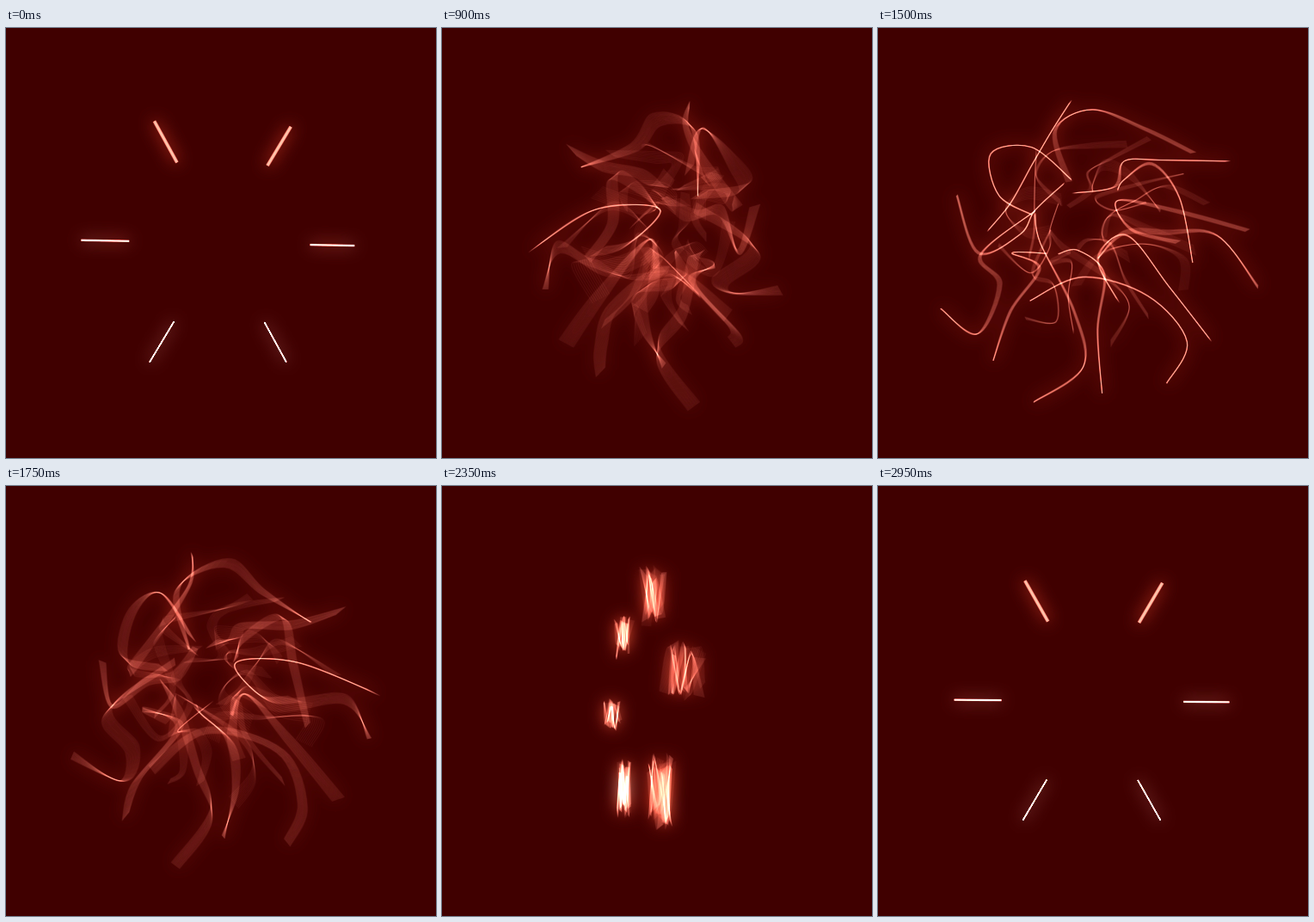
Write an HTML page with a canvas that moves like this. It is 500 by 500 pixels and loops after 3000 ms.

```html
<!DOCTYPE html>
<html lang="en">
<head>
<meta charset="utf-8">
<title>Ribbons</title>
<style>
  html, body { margin: 0; width: 100%; height: 100%; overflow: hidden; background: #400000; }
  canvas { display: block; width: 500px; height: 500px; }
</style>
</head>
<body>
<canvas id="stage" width="500" height="500"></canvas>
<script>
const SIZE = 500, MID = 250, LOOP = 3000, LEAD = 85;
const FOLDED = 585, OPEN = 1385;
const POINTS = 5;

const stage = document.getElementById('stage').getContext('2d');
const layer = document.createElement('canvas');
layer.width = layer.height = SIZE;
const ink = layer.getContext('2d');

// Fully opened strands, clockwise from the top, outer end first.
const OPEN_STRANDS = [
  [275, 85, 298, 120, 322, 160, 348, 205, 374, 236],
  [320, 218, 360, 195, 370, 146, 322, 138, 276, 176],
  [408, 194, 384, 262, 335, 240, 318, 212, 283, 180],
  [428, 327, 385, 358, 359, 300, 382, 265, 318, 213],
  [365, 388, 345, 330, 312, 280, 345, 262, 305, 262],
  [318, 436, 260, 395, 272, 330, 312, 250, 318, 215],
  [238, 425, 243, 350, 236, 285, 268, 258, 292, 262],
  [163, 413, 139, 365, 185, 312, 262, 290, 325, 318],
  [113, 361, 160, 300, 210, 240, 245, 268, 222, 318],
  [57, 300, 105, 240, 165, 237, 215, 238, 245, 268],
  [135, 272, 150, 195, 182, 156, 215, 175, 222, 188],
  [70, 236, 150, 213, 222, 200, 205, 235, 150, 250],
  [92, 154, 170, 153, 215, 155, 225, 185, 272, 192],
  [132, 146, 190, 117, 252, 94, 296, 118, 280, 178]
];
const LAST = OPEN_STRANDS.length - 1;
const SPOKE = [0, 0, 1, 1, 2, 2, 2, 3, 3, 3, 4, 4, 5, 5];

// Centre and half size of each folded bundle.
const BUNDLES = [
  [256, 128, 16, 38], [222, 211, 27, 36], [249, 352, 19, 46],
  [292, 352, 10, 35], [303, 267, 12, 19], [290, 176, 11, 28]
];

const rad = deg => deg * Math.PI / 180;
const clamp = v => Math.max(0, Math.min(1, v));
const smooth = v => v * v * (3 - 2 * v);
const mix = (a, b, k) => a.map((v, i) => v + (b[i] - v) * k);
const random = n => {
  const v = Math.sin(n * 127.1 + 3.7) * 43758.5453;
  return v - Math.floor(v);
};

// Every pose returns [x, y, dx, dy]: a point and the ribbon's width vector there.
function spokePose(spoke, p, turn) {
  const angle = rad(240 - 60 * spoke);
  const radius = 160 - 54 * p / (POINTS - 1);
  const yaw = rad(34 * turn + 40 * turn * turn), roll = rad(7.6 * turn);
  const flatX = radius * Math.cos(angle);
  const scale = 700 / (700 + flatX * Math.sin(yaw));
  const x = flatX * Math.cos(yaw) * scale;
  const y = radius * Math.sin(angle) * scale;
  const width = 1.65 - 1.85 * Math.sin(angle);
  return [
    MID + x * Math.cos(roll) - y * Math.sin(roll),
    MID + x * Math.sin(roll) + y * Math.cos(roll),
    -Math.sin(angle) * width, Math.cos(angle) * width
  ];
}

function bundlePose(strand, p, ghost) {
  const [cx, cy, w, h] = BUNDLES[SPOKE[strand]];
  const seed = strand * 17 + p * 3 + ghost * 311;
  const side = strand % 2 ? 1 : -1;
  const x = w * side * ((p - 2) * 0.33 + 0.5 * (random(seed) - 0.5));
  const y = h * (p % 2 ? -1 : 1) * side * (0.45 + 0.55 * random(seed + 1));
  return [cx + x, cy + y,
    w * 1.1 * (random(seed + 2) - 0.3), h * 0.6 * (random(seed + 5) - 0.5)];
}

function openPose(strand, p, ghost) {
  let x = OPEN_STRANDS[strand][2 * p], y = OPEN_STRANDS[strand][2 * p + 1];
  if (ghost) {
    const dx = x - 264, dy = y - 225, a = 0.5;
    x = 264 + 0.68 * (dx * Math.cos(a) - dy * Math.sin(a));
    y = 225 + 0.68 * (dx * Math.sin(a) + dy * Math.cos(a));
  }
  const seed = strand * 7 + ghost * 53;
  const facing = 6.28 * random(seed);
  const width = (2 + 7 * random(seed + 1)) * (1 + 0.8 * ghost) * Math.sin(6.28 * random(seed + 2) + p * 0.9);
  return [x, y, Math.cos(facing) * width, Math.sin(facing) * width];
}

function strandPose(strand, p, time, ghost) {
  const bundle = bundlePose(strand, p, ghost);
  if (time < FOLDED) {
    const turn = time / FOLDED;
    return mix(spokePose(SPOKE[strand], p, turn), bundle, turn ** 3);
  }
  const q = clamp((time - FOLDED) / (OPEN - FOLDED));
  const pose = mix(bundle, openPose(strand, p, ghost), 1 - (1 - q) ** 2.2);
  const swell = Math.sin(Math.PI * q);
  const seed = strand * 5 + p + ghost * 91;
  pose[0] += 14 * swell * Math.sin(seed * 2.1 + q * 3);
  pose[1] += 14 * swell * Math.cos(seed * 1.7 + q * 3);
  pose[2] += 14 * swell * Math.sin(strand + p * 0.8);
  pose[3] += 14 * swell * Math.cos(strand * 2.3 + p * 0.8);
  return pose;
}

const mirror = ([x, y, dx, dy]) => [SIZE - x, y, -dx, dy];

// The second half runs back as a mirror image.
function ribbonAt(strand, time, ghost) {
  const near = Math.min(time, LOOP - time);
  const swap = smooth(clamp((time - 1400) / 200));
  return Array.from({ length: POINTS }, (_, p) => {
    if (swap === 0) return strandPose(strand, p, near, ghost);
    const back = mirror(strandPose(LAST - strand, p, near, ghost));
    return swap === 1 ? back : mix(strandPose(strand, p, near, ghost), back, swap);
  });
}

function strokeCurve(points) {
  const at = i => points[Math.max(0, Math.min(points.length - 1, i))];
  ink.beginPath();
  ink.moveTo(...points[0]);
  for (let i = 0; i < points.length - 1; i++) {
    const [a, b, c, d] = [at(i - 1), at(i), at(i + 1), at(i + 2)];
    ink.bezierCurveTo(
      b[0] + (c[0] - a[0]) / 6, b[1] + (c[1] - a[1]) / 6,
      c[0] - (d[0] - b[0]) / 6, c[1] - (d[1] - b[1]) / 6,
      c[0], c[1]);
  }
  ink.stroke();
}

function drawRibbon(ribbon, copies) {
  for (let n = 0; n < copies; n++) {
    const k = n / (copies - 1) - 0.5;
    strokeCurve(ribbon.map(([x, y, dx, dy]) => [x + dx * k, y + dy * k]));
  }
}

function draw(ms) {
  const time = (ms + LEAD) % LOOP;
  ink.globalCompositeOperation = 'source-over';
  ink.fillStyle = '#000';
  ink.fillRect(0, 0, SIZE, SIZE);
  ink.globalCompositeOperation = 'lighter';
  ink.strokeStyle = 'rgb(12, 8, 7)';
  ink.lineWidth = 1.1;
  for (let strand = 0; strand <= LAST; strand++) {
    drawRibbon(ribbonAt(strand, time, 0), 22);
    drawRibbon(ribbonAt(strand, time, 1), 10);
  }

  stage.globalCompositeOperation = 'source-over';
  stage.fillStyle = '#400000';
  stage.fillRect(0, 0, SIZE, SIZE);
  stage.globalCompositeOperation = 'lighter';
  stage.drawImage(layer, 0, 0);
  stage.globalAlpha = 0.6;
  stage.filter = 'blur(9px) saturate(3)';
  stage.drawImage(layer, 0, 0);
  stage.filter = 'none';
  stage.globalAlpha = 1;
}

const start = performance.now();
function tick() {
  draw((performance.now() - start) % LOOP);
  requestAnimationFrame(tick);
}
tick();
</script>
</body>
</html>
```
